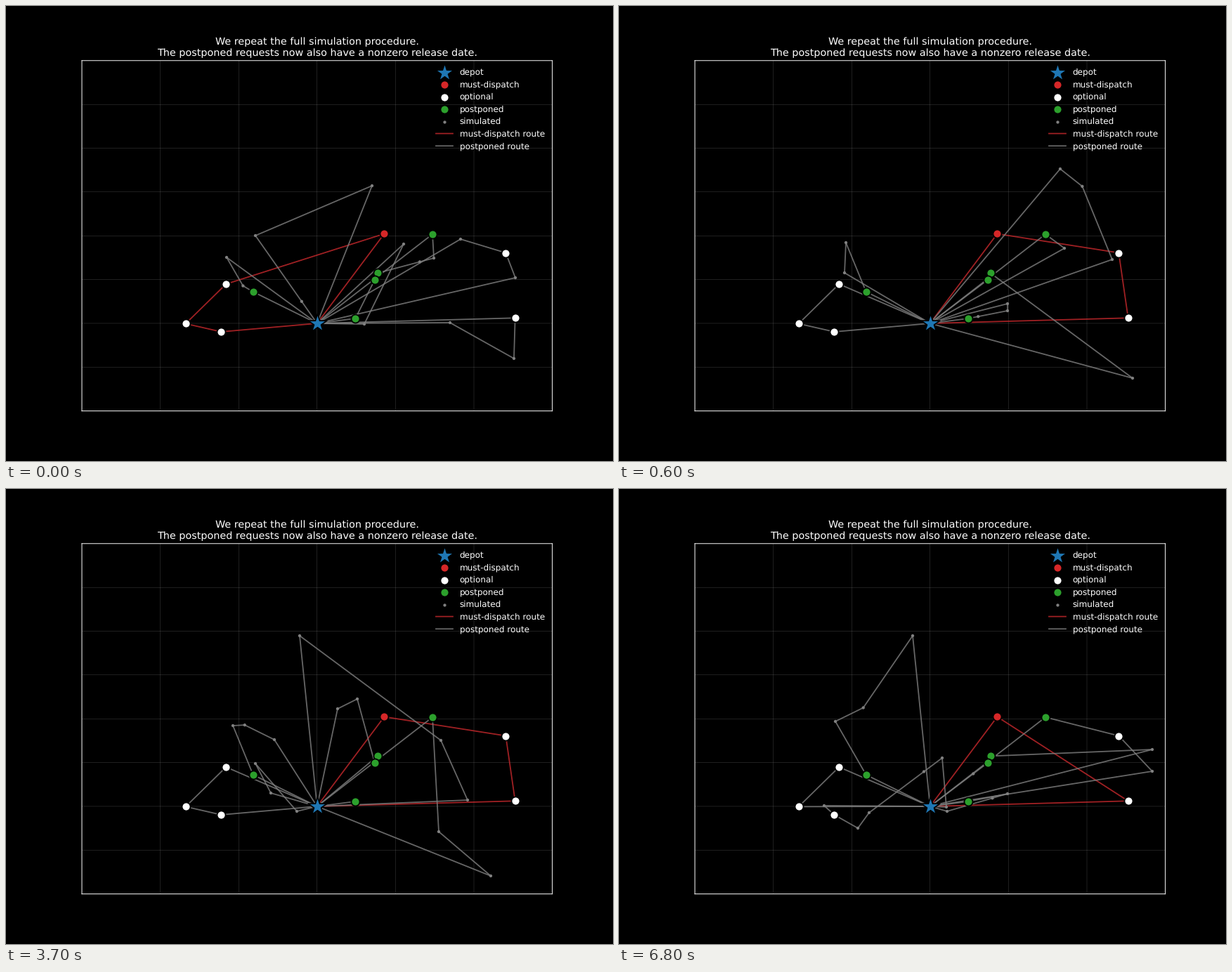
These frames come from a looping animation (864 px wide and 648 px high, 8 s). A matplotlib script:

```python
import matplotlib.pyplot as plt
import numpy as np
from matplotlib.animation import FuncAnimation
from matplotlib.collections import LineCollection
from matplotlib.colors import to_rgb

WIDTH, HEIGHT, DPI = 864, 648, 72
STEP, LOOP = 50, 8000
FIRST_CHANGE, HOLD, FADE_STEPS = 500, 3100, 3
LINE_ALPHA = 0.8
RED, GREY = to_rgb("#c8292d"), to_rgb("grey")

# Locations are complex numbers in stage pixels, y pointing down
DEPOT = 442.8 + 452j
MUST = 538.4 + 324.4j
OPTIONAL = W1, W2, W3, W4, W5 = (
    313.2 + 396j, 255.7 + 452.4j, 306.4 + 464j, 711.3 + 351.5j, 724.7 + 444.3j)
POSTPONED = G1, G2, G3, G4, G5 = (
    351.7 + 407j, 607 + 325j, 528.8 + 380.4j, 524.8 + 390j, 497.3 + 445j)
FIXED = {DEPOT, MUST, *OPTIONAL, *POSTPONED}

# A float among the stops is a simulated stop on the way, bowed sideways by it
VIA, BOW = 0.0, 0.1
ON_WAY = 0.75

# Each plan: the must-dispatch route, then the postponed ones, depot implied
PLANS = [
    [[MUST, W1, W2, W3],
     [521 + 256j, 355 + 327j, VIA],
     [314 + 358j, BOW, G1],
     [566 + 339j, 510 + 453j],
     [G5, G4, G3, VIA, 609 + 359j, G2],
     [647 + 332j, W4, 725 + 387j],
     [W5, 723 + 502j, 632 + 451j]],
    [[MUST, W4, W5],
     [W1, W2, W3],
     [G1, 323 + 337j, 321 + 380j],
     [702 + 361j, BOW, 628 + 232j],
     [G2, 634 + 345j],
     [G4, G3, 731 + 530j],
     [553 + 424j, 553 + 434j, VIA, G5]],
    [[MUST, W4, W5],
     [W1, W2, W3],
     [382 + 357j, BOW, 323 + 337j, G1],
     [377 + 433j, 355 + 391j, 414 + 459j],
     [418 + 209j, 619 + 358j, 657 + 443j],
     [472 + 313j, 500 + 299j, G4, G3],
     [G2, 616 + 488j, 690 + 551j],
     [G5]],
    [[MUST, W5],
     [W1, W2],
     [292 + 451j, W3, 340 + 483j, 356 + 461j, VIA, 460 + 383j, 466 + 453j],
     [418 + 209j, -BOW, 308 + 331j, G1],
     [G2, W4, 759 + 402j],
     [VIA, G4, G3, 759 + 371j],
     [467 + 459j, VIA, 553 + 434j, G5]],
]


def xy(points):
    return [(p.real, p.imag) for p in points]


def tour(stops):
    """Close a route at the depot and place its stops on the way."""
    path = [DEPOT, *stops, DEPOT]
    for i, stop in enumerate(path):
        if isinstance(stop, float):
            before, after = path[i - 1], path[i + 1]
            path[i] = before + (after - before) * (ON_WAY + 1j * stop)
    return path


def plan_edges(plan):
    """Map each edge of a plan to its colour."""
    edges = {}
    for k, stops in enumerate(plan):
        path = tour(stops)
        for edge in zip(xy(path), xy(path[1:])):
            edges[tuple(sorted(edge))] = GREY if k else RED
    return edges


def plan_dots(plan):
    return set(xy(p for stops in plan for p in tour(stops) if p not in FIXED))


EDGES = [plan_edges(p) for p in PLANS]
DOTS = [plan_dots(p) for p in PLANS]

plt.rcParams.update({"font.family": "DejaVu Sans", "font.size": 12,
                     "text.color": "white", "text.hinting": "no_hinting",
                     "path.snap": False})
fig = plt.figure(figsize=(WIDTH / DPI, HEIGHT / DPI), dpi=DPI, facecolor="black")
ax = fig.add_axes([0.125, 0.11, 0.775, 0.77], facecolor="black")
left, right, top, bottom = 108, 777.6, 77.76, 576.72
ax.set(xlim=(left, right), ylim=(bottom, top),
       xticks=np.linspace(left, right, 7), yticks=np.linspace(top, bottom, 9))
ax.tick_params(length=0, labelbottom=False, labelleft=False)
ax.grid(color="grey", linestyle="solid", linewidth=0.24)
ax.set_axisbelow(True)
for spine in ax.spines.values():
    spine.set(color="white", linewidth=0.96)
ax.set_title("We repeat the full simulation procedure.\n"
             "The postponed requests now also have a nonzero release date.",
             fontsize=14.4, pad=6.5)


def place(points, color, label, diameter=12, marker="o"):
    return ax.scatter(*zip(*xy(points)), s=diameter ** 2, c=color, marker=marker,
                      edgecolors="black", linewidths=1.8, zorder=4, label=label)


def legend_line(color, label):
    return ax.plot([], [], color=color, alpha=LINE_ALPHA, lw=1.8, label=label)[0]


routes = LineCollection([], linewidths=1.8, zorder=2)
ax.add_collection(routes, autolim=False)
simulated = ax.scatter([], [], s=4.3 ** 2, color="grey", linewidths=0,
                       zorder=3, label="simulated")
ax.legend(handles=[
    place([DEPOT], "tab:blue", "depot", 28, "*"),
    place([MUST], "tab:red", "must-dispatch"),
    place(OPTIONAL, "white", "optional"),
    place(POSTPONED, "tab:green", "postponed"),
    simulated,
    legend_line(RED, "must-dispatch route"),
    legend_line(GREY, "postponed route"),
], loc="upper right", frameon=False)


def plan_weights(time):
    """Share of each visible plan, cross-fading between neighbours."""
    starts = FIRST_CHANGE + HOLD * np.arange(len(PLANS) - 1)
    steps = np.clip((time - starts) // STEP + 1, 0, FADE_STEPS)
    position = steps.sum() / FADE_STEPS
    shares = [1 - abs(position - k) for k in range(len(PLANS))]
    return [(k, share) for k, share in enumerate(shares) if share > 1e-6]


def update(frame):
    edge_mix, dot_mix = {}, {}
    for k, share in plan_weights(frame * STEP):
        for edge, color in EDGES[k].items():
            mix = edge_mix.setdefault(edge, np.zeros(4))
            mix += share * np.array([*color, 1])
        for dot in DOTS[k]:
            dot_mix[dot] = dot_mix.get(dot, 0) + share

    colors = [[*(mix[:3] / mix[3]), LINE_ALPHA * mix[3]]
              for mix in edge_mix.values()]
    routes.set_segments(list(edge_mix))
    routes.set_color(np.clip(colors, 0, 1))
    simulated.set_offsets(list(dot_mix))
    simulated.set_facecolor([(*GREY, min(share, 1)) for share in dot_mix.values()])
    return routes, simulated


animation = FuncAnimation(fig, update, frames=LOOP // STEP, interval=STEP,
                          repeat=True, repeat_delay=0, blit=False)
plt.show()
```
